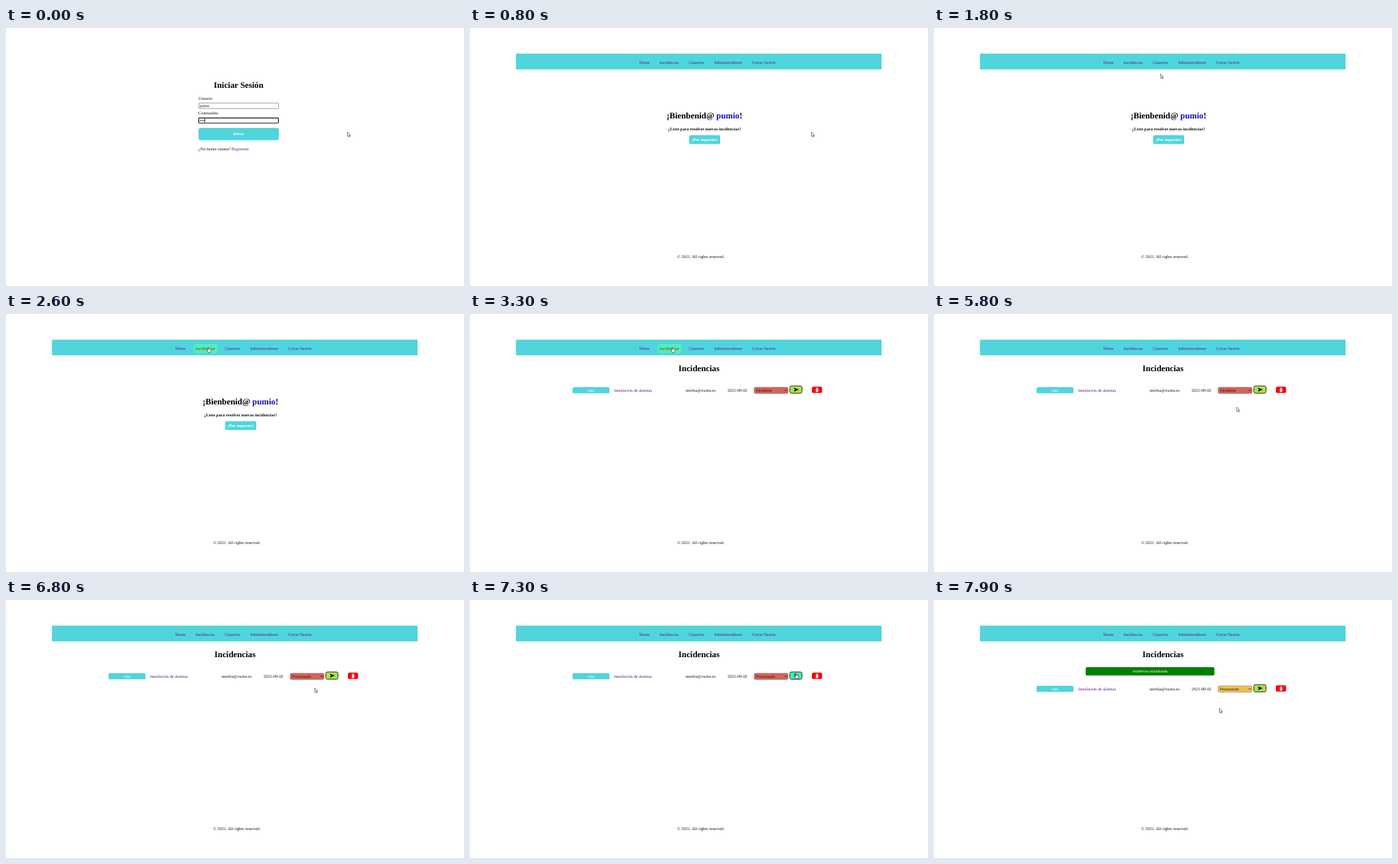
Recreate the animation shown at these times as an HTML page. Size 690x388 px, loop 8000 ms.

```html
<!DOCTYPE html>
<html lang="es">
<head>
<meta charset="utf-8">
<title>Incidencias</title>
<style>
html, body { margin: 0; width: 100%; height: 100%; overflow: hidden; background: #fff; }
svg { display: block; width: 100vw; height: 100vh; }
text { font: 6.4px "Liberation Serif", "Times New Roman", serif; fill: #111; text-rendering: geometricPrecision; white-space: pre; }
.h1 { font-size: 12.8px; font-weight: bold; fill: #000; }
.b { font-weight: bold; }
.ui { font: 5.33px "Liberation Sans", Arial, sans-serif; }
.ui.b { font-weight: bold; }
.mid { text-anchor: middle; }
.white { fill: #fff; }
.link { fill: #551a8b; }
.teal { fill: #50d5dc; }
</style>
</head>
<body>
<svg viewBox="0 0 690 388">
  <g id="login">
    <text class="h1 mid" x="350.4" y="90.2">Iniciar Sesión</text>
    <text x="290" y="107.8">Usuario:</text>
    <rect x="290.4" y="112.9" width="120.2" height="8.2" rx=".8" fill="#fff" stroke="#858585" stroke-width=".8"/>
    <text class="ui" x="291.7" y="118.8">pumio</text>
    <text x="290" y="130.2">Contraseña:</text>
    <rect x="290.4" y="135.3" width="120" height="7.7" rx=".8" fill="#fff" stroke="#101010" stroke-width="1.2"/>
    <text class="ui" x="291.7" y="141">••••</text>
    <rect id="caret" x="299" y="136.4" width=".8" height="5.8"/>
    <rect class="teal" x="290" y="150.2" width="121" height="18.6" rx="3"/>
    <text class="ui b white mid" x="350.4" y="161.3">Entrar</text>
    <text x="290" y="184.3">¿No tienes cuenta? <tspan class="link">Registrate</tspan></text>
  </g>

  <g id="site">
    <rect class="teal" x="69.2" y="38.6" width="550.9" height="23.6"/>
    <rect id="navHover" x="283" y="45" width="35" height="14" rx="2.4" fill="#50f0bb"/>
    <text class="link" x="255" y="54.1">Home<tspan dx="15" id="navIssues">Incidencias</tspan><tspan dx="15">Usuarios</tspan><tspan dx="15">Administradores</tspan><tspan dx="15">Cerrar Sesión</tspan></text>
    <text class="mid" x="347.8" y="346">© 2021. All rights reserved.</text>
  </g>

  <g id="welcome">
    <text class="h1 mid" x="353.2" y="136.4">¡Bienbenid@ <tspan fill="#1010b8">pumio</tspan>!</text>
    <text class="b mid" x="353.3" y="154.3">¿Listo para resolver nuevas incidencias?</text>
    <rect class="teal" x="330.2" y="161.2" width="46.8" height="13.4" rx="2.6"/>
    <text class="b white mid" x="353.6" y="170">¡Por supuesto!</text>
  </g>

  <g id="issues">
    <text class="h1 mid" x="345" y="85.8">Incidencias</text>
    <g id="notice">
      <rect x="228.5" y="101" width="194" height="12.6" rx="2.6" fill="#008000"/>
      <text class="ui white mid" x="325.5" y="109.2">Incidencia actualizada</text>
    </g>
    <g id="row">
      <rect class="teal" x="154.4" y="110" width="55.8" height="9.3" rx="2.6"/>
      <text class="ui white mid" x="182" y="116.6">nela</text>
      <text class="link" x="217" y="116.6">Instalación de alarmas</text>
      <text x="324.8" y="116.6">nerelia@vurno.es</text>
      <text x="388" y="116.6">2021-09-02</text>
      <rect id="select" x="428.2" y="110.2" width="51" height="9.4" rx="2.4" stroke="#6b5550" stroke-width=".5"/>
      <text id="state" class="ui" x="431" y="116.7"></text>
      <path d="M474.2 114l1.5 1.5 1.5-1.5" fill="none" stroke="#000" stroke-width=".9"/>
      <rect id="send" x="481.8" y="108.2" width="18.4" height="11" rx="2.4" stroke="#26331a"/>
      <path d="M488 110.7l7.2 3-7.2 3 1.5-3z"/>
      <rect x="515" y="109.2" width="15.5" height="9.6" rx="2.6" fill="#f30808"/>
      <path d="M520.7 111.4h1.3l.4-.6h.9l.4.6h1.3v.7h-4.3zM521 112.5h3.7v4.2q0 .6-.6.6h-2.5q-.6 0-.6-.6z" fill="#fff"/>
      <path d="M522.2 113.4v3M523.5 113.4v3" stroke="#f66" stroke-width=".4"/>
    </g>
  </g>

  <g id="pointer" stroke="#222" stroke-width=".6" stroke-linejoin="round" fill="#fff">
    <path id="arrow" d="M0 0V6.5L1.5 5.1 2.6 7.5 3.7 7 2.6 4.7H4.6Z"/>
    <path id="hand" d="M-.7 .5Q0-.3 .7 .5V3L1.8 3.2 3.6 3.8Q4.2 4 4.1 5L3.5 8H-.3L-2.3 5.2Q-2.3 4.3-1.5 4.7L-.7 5.3Z"/>
  </g>
</svg>
<script>
const LOOP = 8000, STEP = 100;
const $ = id => document.getElementById(id);
const show = (id, on) => $(id).setAttribute("display", on ? "inline" : "none");
const fill = (id, color) => $(id).setAttribute("fill", color);

// Pointer moves: start and end time, then where it comes to rest
const home = [514.5, 156.6];
const moves = [
  [1300, 1600, 348, 72.5],
  [1700, 2100, 304.8, 49.8],
  [3400, 4000, 405.5, 100],
  [4200, 4500, 453, 117],
  [4700, 4800, 453, 120],
  [5300, 5500, 451, 114],
  [5500, 5800, 456, 140],
  [6600, 7200, 491, 110],
  [7300, 7700, 455, 172],
  [7800, 7900, 430, 163]
];

function pointerAt(t) {
  let [x, y] = home;
  for (const [from, to, endX, endY] of moves) {
    const k = Math.min(1, Math.max(0, (t - from) / (to - from)));
    const ease = k * k * (3 - 2 * k);
    x += (endX - x) * ease;
    y += (endY - y) * ease;
  }
  return [x, y];
}

const inside = (x, y, l, t, r, b) => x > l && x < r && y > t && y < b;

function draw(t) {
  const [x, y] = pointerAt(Math.floor(t / STEP) * STEP);
  const page = t < 800 ? "login" : t < 2700 ? "welcome" : "issues";
  const saved = t >= 7500;
  for (const id of ["login", "welcome", "issues"]) show(id, id === page);
  show("site", page !== "login");
  show("caret", t < 100 || t >= 600);

  const overNav = page !== "login" && inside(x, y, 283, 45, 318, 59);
  const overSend = page === "issues" && !saved && inside(x, y, 481, 108, 501, 120);
  show("navHover", overNav);
  $("navIssues").style.fill = overNav ? "#8a3520" : "";

  show("notice", saved);
  $("row").setAttribute("transform", `translate(0 ${saved ? 19 : 0})`);
  $("state").textContent = t < 6500 ? "Pendiente" : "Procesando";
  $("state").style.fill = saved ? "#111" : "#35100e";
  fill("select", saved ? "#f0c04c" : "#d9605a");
  fill("send", overSend ? "#45ecb9" : "#b0dc4e");

  const hand = overNav || overSend;
  show("hand", hand);
  show("arrow", !hand);
  $("pointer").setAttribute("transform", `translate(${x} ${y})`);
}

const start = performance.now();
function tick() {
  draw((performance.now() - start) % LOOP);
  requestAnimationFrame(tick);
}
tick();
</script>
</body>
</html>
```
